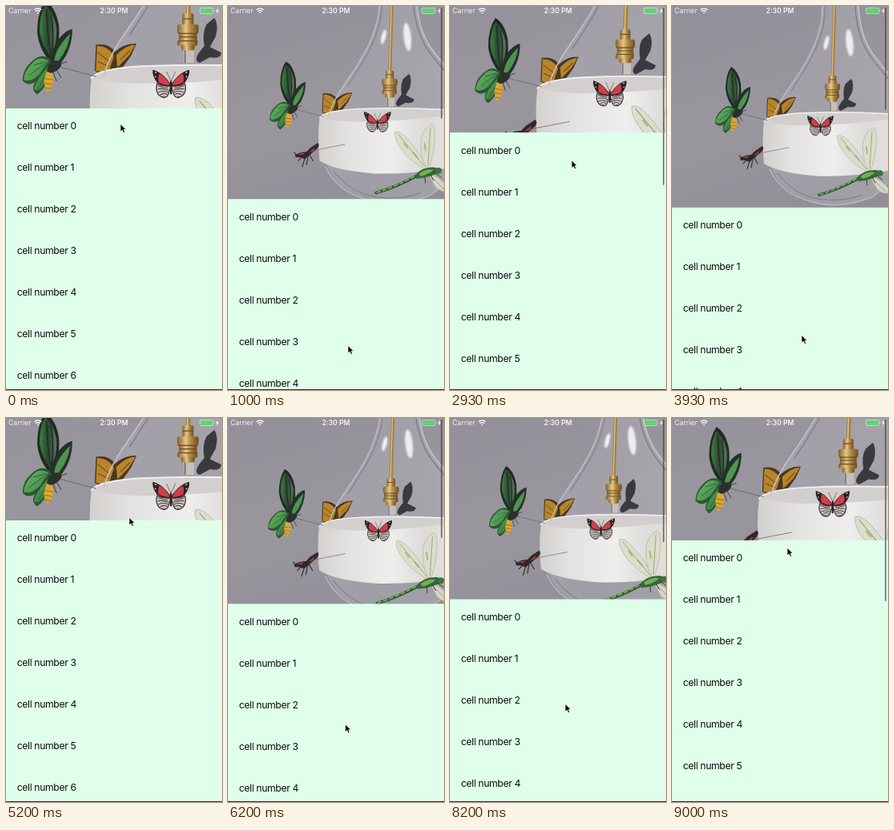
An HTML page that plays this animation: 270 px wide and 480 px high, repeating every 9.07 s.

```html
<!DOCTYPE html>
<html lang="en">
<head>
<meta charset="utf-8">
<title>Stretchy header</title>
<style>
html, body { margin: 0; width: 100%; height: 100%; overflow: hidden; background: #e0ffea; }
svg { display: block; width: 100vw; height: 100vh; }
text { font-family: Inter, Roboto, sans-serif; }
#cells text { font-size: 12.2px; letter-spacing: -.35px; fill: #0a0f0c; }
.bar text { font-size: 8.7px; fill: #f4f4f6; }
.line { fill: none; stroke-linecap: round; stroke-linejoin: round; }
</style>
</head>
<body>
<svg viewBox="0 0 270 480">
<defs>
  <linearGradient id="wall" x1="0" y1="0" x2=".3" y2="1">
    <stop offset="0" stop-color="#908d96"/><stop offset=".6" stop-color="#99969e"/><stop offset="1" stop-color="#918e97"/>
  </linearGradient>
  <linearGradient id="glass" x1="0" x2="1">
    <stop offset="0" stop-color="#b9b8c0" stop-opacity=".4"/><stop offset=".3" stop-color="#b0aeb6" stop-opacity=".4"/>
    <stop offset=".75" stop-color="#b8b6bc" stop-opacity=".45"/><stop offset="1" stop-color="#c6c5ca" stop-opacity=".5"/>
  </linearGradient>
  <linearGradient id="brass" x1="0" x2="1">
    <stop offset="0" stop-color="#80602b"/><stop offset=".4" stop-color="#e4c889"/><stop offset=".6" stop-color="#b98f47"/><stop offset="1" stop-color="#6d4f22"/>
  </linearGradient>
  <linearGradient id="shade" x1="0" x2="1">
    <stop offset="0" stop-color="#d3d0ce"/><stop offset=".2" stop-color="#e4e2e0"/><stop offset=".5" stop-color="#efeeec"/>
    <stop offset=".72" stop-color="#dedbd9"/><stop offset="1" stop-color="#e4e2e0"/>
  </linearGradient>
  <linearGradient id="leaf" x1="0" y1="0" x2="1" y2="1">
    <stop offset="0" stop-color="#68b565"/><stop offset="1" stop-color="#347a3b"/>
  </linearGradient>
  <linearGradient id="wing" x1="0" y1="0" x2="1" y2="0">
    <stop offset="0" stop-color="#3f8043"/><stop offset=".5" stop-color="#2b4631"/><stop offset="1" stop-color="#5c7a5b"/>
  </linearGradient>
  <filter id="soft" x="-50%" y="-50%" width="200%" height="200%"><feGaussianBlur stdDeviation="1"/></filter>
  <g id="half">
    <path d="M0 1C4-5 9-11 17-13Q18-8 13-1Q7 3 0 3Z" fill="#2c2022"/>
    <path d="M1 1C4-4 7-8 11-9.500Q13-4 11-1Q5 2 1 1Z" fill="#d23f49"/>
    <path d="M13.500-10l1.500-1M14-6l1-1" stroke="#d9cfcc" stroke-width="1"/>
    <path d="M0 2Q7 3 13 0Q15 6 11 11Q6 15 3 11Z" fill="#cfc8c5" stroke="#332b2c" stroke-width=".9"/>
    <path class="line" d="M3 4Q7 4 12 2M2.500 6Q8 4 12 5M3 8Q8 6 11.500 8M4 10Q7 8 10 10.500M6 12l3 0" stroke="#4a4142" stroke-width=".8"/>
  </g>
</defs>

<g id="photo">
  <rect x="-30" y="-40" width="330" height="340" fill="url(#wall)"/>
  <path d="M188-40V0Q188 20 183 34C177 57 162 80 146 103Q126 132 121 156C113 190 128 220 152 235Q200 262 250 239C290 210 310 140 284 100Q268 82 254 64Q235 40 233 0V-40Z" fill="url(#glass)"/>

  <!-- pendant -->
  <path d="M202.500-40L206.500-40L202.500 90H198.500Z" fill="#a4803f"/>
  <path d="M204-40L200 90" stroke="#dcc28a" stroke-width="1.200"/>
  <path d="M215 116Q213 104 217 97L224 91Q228 97 225 108L220 117L230 122Q230 128 220 126L211 131Q205 129 211 121Z" fill="#3a393f"/>

  <!-- orange butterfly behind the rim -->
  <path d="M119 115Q130 113 136 121Q145 113 155 114L150 125L142 136L125 142L118 138Z" fill="#4a3820"/>
  <path d="M120 116Q130 116 135 125L130 140L119 138ZM137 124Q146 115 154 115L148 125L138 135Z" fill="#b98529"/>
  <path class="line" d="M121 122L131 130M121 130L130 134M141 128L149 120" stroke="#6b4a1e" stroke-width=".8"/>

  <!-- lamp shade -->
  <path d="M115 145Q122 136 160 134Q220 131 290 136V152H225Q140 156 115 145Z" fill="#d2cfce"/>
  <path d="M115 144Q138 151 180 149Q230 148 290 139V202Q235 214 182 212.500Q134 209 115 197Q112 168 115 144Z" fill="url(#shade)"/>
  <path class="line" d="M115 144.500Q122 136 160 134Q220 131 290 136" stroke="#f1f0ef" stroke-width="1.500"/>

  <!-- socket -->
  <rect x="197" y="117" width="9" height="14" rx="2" fill="#c5c0bd"/>
  <path d="M198 119v12" stroke="#75706c" stroke-width="1.200"/>
  <g fill="url(#brass)">
    <rect x="195.500" y="87" width="10" height="11" rx="2"/>
    <rect x="191" y="97" width="19" height="8" rx="2"/>
    <rect x="192.500" y="104" width="16" height="9"/>
    <rect x="191" y="111" width="18" height="5" rx="2"/>
    <rect x="194.500" y="115" width="12" height="5" rx="2"/>
  </g>
  <path d="M192 105h17M193 108h15M192 111.500h17M196 92h9" stroke="#6e4d20" stroke-width=".9"/>

  <!-- glass edges -->
  <g class="line">
    <path d="M188-40V0Q188 20 183 34C177 57 162 80 146 103Q131 124 126 142" stroke="#c3c2ca" stroke-width="1.200"/>
    <path d="M191 0Q191 22 186 36C180 59 164 83 149 106" stroke="#85828c" stroke-width="1.200"/>
    <path d="M233-40V0Q235 40 254 64Q268 82 284 100" stroke="#c8c7ce" stroke-width="1.400"/>
    <path d="M229 0Q231 41 250 66Q262 82 274 95" stroke="#817e88" stroke-width="1.400"/>
    <path d="M122 204Q134 228 156 238Q200 259 250 239Q267 228 277 210" stroke="#b8b7bf" stroke-width="1.400"/>
    <path d="M132 209Q148 230 170 238Q205 248 238 236" stroke="#827f89" stroke-width="1"/>
  </g>
  <g fill="#f6f6f8" filter="url(#soft)">
    <ellipse cx="193" cy="46" rx="2.500" ry="9" transform="rotate(14 193 46)"/>
    <ellipse cx="222" cy="46" rx="4.500" ry="17" transform="rotate(-6 222 46)" opacity=".9"/>
  </g>

  <!-- green butterfly -->
  <path class="line" d="M88 135L119 143" stroke="#6a6770" stroke-width=".7"/>
  <path d="M74 76Q83 81 86 97Q88 117 80 131Q69 121 67 104Q67 86 74 76Z" fill="#1f2a23"/>
  <path d="M74 80Q81 85 84 99Q85 114 79 126Q71 116 69 103Q69 88 74 80Z" fill="url(#wing)"/>
  <path class="line" d="M75 84Q76 105 79 125M79 88Q82 104 80 122" stroke="#222e26" stroke-width="1.200"/>
  <path d="M98 101Q98 119 88 131L79 135Q78 122 85 111Q92 102 98 101Z" fill="#243128"/>
  <path d="M96 105Q95 118 86 129L82 131Q82 119 96 105Z" fill="#4f9450"/>
  <path d="M79 128Q70 121 61 131Q54 137 54 147Q59 152 65 148Q61 155 67 159Q75 153 78 142Z" fill="#2b5632"/>
  <path d="M77 129Q68 124 62 132Q55 139 55 146Q61 149 69 141ZM76 135Q66 146 64 154Q68 158 73 150Z" fill="url(#leaf)"/>
  <path class="line" d="M75 131L60 142M75 130L64 133M77 139L68 153" stroke="#2f6437" stroke-width=".7"/>
  <path d="M75 139Q82 138 81 147Q80 154 76 157Q73 153 73 147Z" fill="#d9a834"/>
  <path d="M74 145l7 1M73 149l7 1M74 153l5 1" stroke="#9f6d1c" stroke-width=".8"/>
  <path d="M77 133Q81 127 88 130Q90 134 84 138Q78 142 76 138Z" fill="#2a302b"/>
  <path class="line" d="M85 131L92 125M87 132L93 130M84 137L88 144M81 139L84 147" stroke="#35393a" stroke-width=".7"/>

  <!-- fly -->
  <path class="line" d="M110 184L146 177" stroke="#77737a" stroke-width=".7"/>
  <path d="M85 190Q92 186 99 186L104 181L113 175Q116 179 111 183L103 190L97 195Q91 192 86 193Z" fill="#33272a"/>
  <path d="M88 189L97 187L94 190ZM102 187L109 181L108 185Z" fill="#a4493c"/>
  <path class="line" d="M93 193L89 197M97 194L94 204M101 192L99 202M103 190L107 197M87 190L84 187" stroke="#2c2427" stroke-width="1"/>

  <!-- red butterfly -->
  <g transform="translate(185.500 149.500) scale(.95)">
    <use href="#half"/><use href="#half" transform="scale(-1 1)"/>
    <path class="line" d="M0-2V9" stroke="#2a2021" stroke-width="1.800"/>
    <path class="line" d="M0-2L-4-11M0-2L4-11" stroke="#4a4042" stroke-width=".5"/>
  </g>

  <!-- dragonfly -->
  <g fill="#dcdccb" fill-opacity=".88" stroke="#a3a58e" stroke-width=".5">
    <path d="M243 207Q222 195 212 179Q206 169 207 162Q213 160 223 171Q237 187 246 205Z"/>
    <path d="M245 206Q236 188 239 169Q243 155 252 152Q257 157 255 176Q253 194 248 206Z"/>
    <path d="M247 212Q258 214 274 231Q268 239 256 229Z"/>
  </g>
  <path class="line" d="M243 204L211 165M247 203L250 157M249 214L267 232" stroke="#8f9a6a" stroke-width=".8"/>
  <path class="line" d="M218 176l4 5M229 187l5 6M243 176l1 8" stroke="#8aa45d" stroke-width="2" opacity=".6"/>
  <path class="line" d="M184 236Q207 230 236 214" stroke="#2c5230" stroke-width="3.600"/>
  <path class="line" d="M185 235.500Q207 229 236 213" stroke="#67ad54" stroke-width="2" stroke-dasharray="4 3.500"/>
  <path d="M231 215Q240 204 255 205Q262 206 261 211Q248 218 233 219Z" fill="#35673a"/>
  <path d="M236 213Q244 206 254 208Q249 213 238 216Z" fill="#75ae58"/>
  <circle cx="260" cy="209" r="3.800" fill="#3f733f"/>
  <path class="line" d="M250 214L254 221M256 212L263 217M243 217L244 224" stroke="#293629" stroke-width=".9"/>
</g>

<g id="table">
  <rect width="270" height="500" fill="#e0ffea"/>
  <g id="cells"></g>
</g>
<rect y="479" width="270" height="1" fill="#2c302e"/>
<rect id="thumb" x="266" y="2" width="2" rx="1" fill="#3c413f" fill-opacity=".6"/>

<g class="bar">
  <text x="3" y="9.200">Carrier</text>
  <g class="line" stroke="#fff" stroke-width="1.300">
    <path d="M36 4.600Q40 1.200 44 4.600M37.600 6.600Q40 4.600 42.400 6.600"/>
  </g>
  <path d="M38.800 8.200Q40 7.200 41.200 8.200L40 9.600Z" fill="#fff"/>
  <text x="135" y="9.200" text-anchor="middle" font-weight="600">2:30 PM</text>
  <rect x="242.500" y="2.500" width="16.500" height="7" rx="1.500" fill="none" stroke="#d9f3de" stroke-width=".7"/>
  <rect x="243.500" y="3.500" width="14.500" height="5" rx=".6" fill="#4fe064"/>
  <path d="M259.800 4.800q1.200 1.200 0 2.400z" fill="#e6f4e8"/>
  <path d="M265 2.500l-2.800 4h1.700l-.8 3.200 3-4.200h-1.800z" fill="#fff"/>
</g>
<path id="cursor" d="M0 0V9.600L2.300 7.600L3.900 11L5.600 10.200L4.100 6.900H7Z" fill="#000" stroke="#fff" stroke-width=".7"/>
</svg>

<script>
const LOOP = 9070, REST = 128, ROW = 52, LAG = 67;
const $ = id => document.getElementById(id);

// pointer path: time, x, y
const path = [
  [0, 143, 148], [90, 143, 152], [500, 146, 300], [933, 150, 420], [1000, 150, 425],
  [1200, 150, 428], [1800, 152, 250], [2400, 152, 112], [2730, 152, 108], [2863, 152, 166],
  [2930, 152, 193], [3400, 157, 340], [3820, 162, 411], [3930, 162, 412], [4200, 161, 395],
  [4800, 156, 205], [5200, 154, 125], [5600, 153, 112], [6000, 149, 290], [6300, 146, 405],
  [6500, 146, 408], [7130, 144, 225], [7450, 144, 132], [7600, 144, 128], [8150, 144, 355],
  [8350, 144, 362], [8933, 144, 176], [9000, 144, 163], [9070, 144, 150]
];
// drags: press, release, anchor y
const drags = [[80, 1150, 150.5], [2740, 3980, 108], [5620, 6380, 112], [7600, LOOP, 128]];

const slope = (i, k) => {
  const a = path[i - 1], b = path[i], c = path[i + 1];
  if (!a || !c) return 0;
  const u = (b[k] - a[k]) / (b[0] - a[0]), v = (c[k] - b[k]) / (c[0] - b[0]);
  return u * v > 0 ? 2 * u * v / (u + v) : 0;
};

function pointer(t, k) {
  t = Math.max(0, t);
  let i = 0;
  while (i < path.length - 2 && path[i + 1][0] <= t) i++;
  const a = path[i], b = path[i + 1], d = b[0] - a[0], u = (t - a[0]) / d, v = 1 - u;
  return v * v * (1 + 2 * u) * a[k] + u * u * (3 - 2 * u) * b[k]
    + d * u * v * (v * slope(i, k) - u * slope(i + 1, k));
}

const rubber = x => 480 * (1 - 1 / (Math.max(0, x) * .55 / 480 + 1));

function scroll(t) {
  const drag = drags.filter(d => d[0] <= t).pop();
  if (!drag) return { pull: 0, alpha: 0 };
  const [press, release, anchor] = drag;
  const held = rubber(pointer(Math.min(t, release) - LAG, 2) - anchor);
  const k = Math.max(0, t - release) / 100;
  const fadeIn = (t - press - LAG) / 60, fadeOut = (release + 1100 - t) / 250;
  return {
    pull: held * (1 + k) * Math.exp(-k),
    alpha: Math.max(0, Math.min(1, fadeIn, fadeOut))
  };
}

$('cells').innerHTML = Array.from({ length: 7 }, (_, i) =>
  `<text x="13.700" y="${26.4 + i * ROW}">cell number ${i}</text>`).join('');

function draw(t) {
  const { pull, alpha } = scroll(t), h = REST + pull;
  $('photo').setAttribute('transform',
    `translate(135 ${h / 2}) scale(${426 / (h + 174)}) translate(-135 -126)`);
  $('table').setAttribute('transform', `translate(0 ${h})`);
  $('thumb').setAttribute('height', 252 - pull);
  $('thumb').setAttribute('opacity', alpha);
  $('cursor').setAttribute('transform', `translate(${pointer(t, 1)} ${pointer(t, 2) - .5})`);
}

const start = performance.now();
function tick() {
  draw((performance.now() - start) % LOOP);
  requestAnimationFrame(tick);
}
tick();
</script>
</body>
</html>
```
